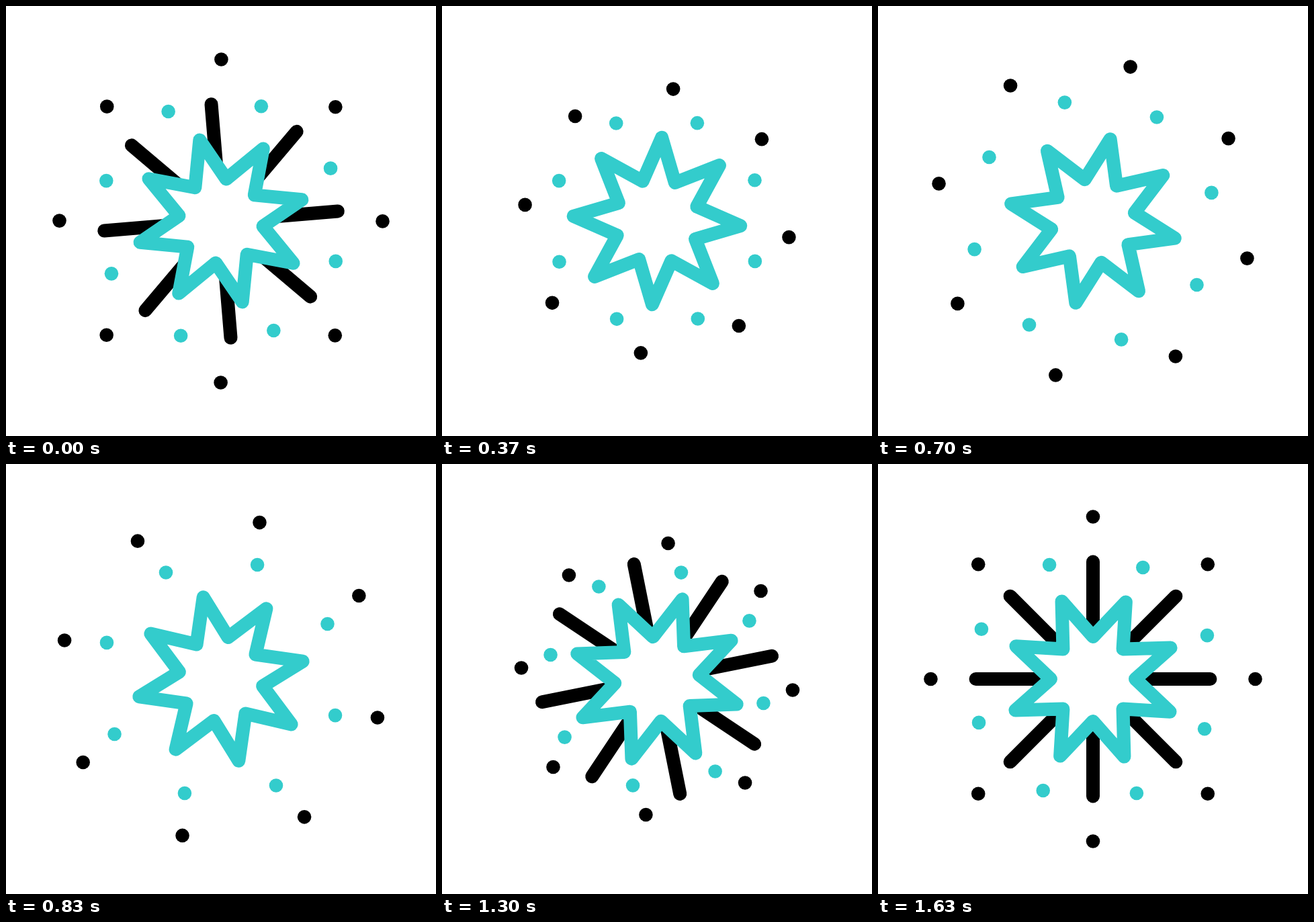
An HTML page with a canvas that plays this animation: 640x640 px, repeating every 1.67 s.

```html
<!DOCTYPE html>
<html lang="en">
<head>
<meta charset="utf-8">
<title>Starburst</title>
<style>
  html, body { margin: 0; width: 100%; height: 100%; overflow: hidden; background: #fff; }
  canvas { display: block; width: 100vmin; height: 100vmin; }
</style>
</head>
<body>
<canvas id="stage" width="640" height="640"></canvas>
<script>
const ctx = document.getElementById('stage').getContext('2d');
const LOOP = 1670, FRAMES = 50, LEAD = 40;
const TEAL = '#33cccc', BLACK = '#000';
const POINTS = 8, STEP = 360 / POINTS;

// Smooth step from 0 at a to 1 at b.
function ease(x, a, b) {
  const s = Math.min(1, Math.max(0, (x - a) / (b - a)));
  return s * s * (3 - 2 * s);
}

// Goes 0, 1, 0, 1 ... through the given key times.
function swing(x, keys) {
  const i = Math.max(1, keys.findIndex(key => x <= key));
  const e = ease(x, keys[i - 1], keys[i]);
  return i % 2 ? e : 1 - e;
}

// Turn fraction: almost linear, a little quicker at the start.
function turn(x) {
  const w = 1 - 2 * x;
  return x + x * (1 - x) * (0.0602 + 0.0141 * w + 0.0392 * w * w);
}

// Angle in degrees, clockwise from the top.
function polar(radius, degrees) {
  const a = degrees * Math.PI / 180;
  return [320 + radius * Math.sin(a), 320 - radius * Math.cos(a)];
}

function dots(radius, angle, color) {
  ctx.fillStyle = color;
  for (let i = 0; i < POINTS; i++) {
    ctx.beginPath();
    ctx.arc(...polar(radius, angle + i * STEP), 10.3, 0, 2 * Math.PI);
    ctx.fill();
  }
}

function rays(radius, angle) {
  ctx.strokeStyle = BLACK;
  ctx.beginPath();
  for (let i = 0; i < POINTS; i++) {
    ctx.moveTo(320, 320);
    ctx.lineTo(...polar(radius, angle + i * STEP));
  }
  ctx.stroke();
}

function star(angle) {
  ctx.beginPath();
  for (let i = 0; i < POINTS; i++) {
    ctx.lineTo(...polar(63, angle + i * STEP));
    ctx.lineTo(...polar(124.5, angle + 23.1 + i * STEP));
  }
  ctx.closePath();
  ctx.fillStyle = '#fff';
  ctx.fill();
  ctx.strokeStyle = TEAL;
  ctx.stroke();
}

function draw(ms) {
  const x = ((ms + LEAD) % LOOP) / LOOP;
  const spin = turn(x);
  const reach = 1 - ease(x, 0.13, 0.36) + ease(x, 0.5, 0.75);

  ctx.fillStyle = '#fff';
  ctx.fillRect(0, 0, 640, 640);
  ctx.lineWidth = 20;
  ctx.lineCap = ctx.lineJoin = 'round';

  rays(174.4 * reach, -180 * spin);
  star(270 * spin);
  dots(241.5 - 44.5 * swing(x, [0, 0.268, 0.492, 0.746, 1]), 14 * swing(x, [0, 0.491, 1]), BLACK);
  dots(181.9 - 26 * swing(x, [0, 0.204, 0.466, 0.706, 1]), 24.1 - 180 * spin, TEAL);
}

// Thirty pictures a second, on a 10 ms grid.
function tick() {
  const t = performance.now() % LOOP;
  const frame = Math.min(FRAMES - 1, Math.floor((t + 5) * 0.03));
  draw(Math.round(frame * 10 / 3) * 10);
  requestAnimationFrame(tick);
}
tick();
</script>
</body>
</html>
```
